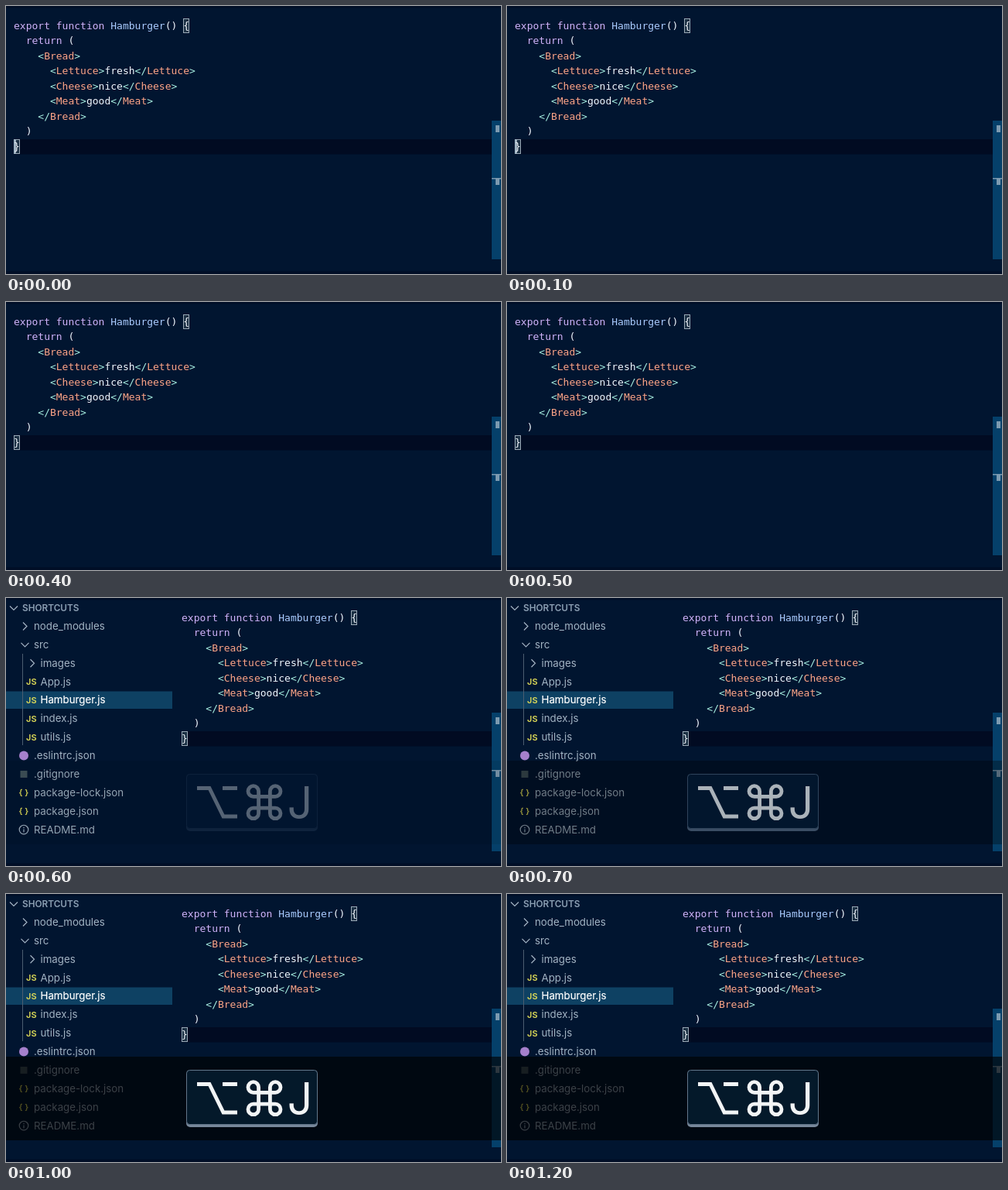
An HTML page that plays this animation: 640 px wide and 346 px high, repeating every 1.3 s.

```html
<!DOCTYPE html>
<html>
<head>
<meta charset="utf-8">
<style>
html, body { margin: 0; width: 100%; height: 100%; overflow: hidden; background: #011530; }
svg { display: block; width: 640px; height: 346px; }
text { white-space: pre; }
#code text { font: 13px "DejaVu Sans Mono", monospace; fill: #f4f8ff; }
#code .word { fill: #d2b4fb; }
#code .func { fill: #acccff; }
#code .mark { fill: #a8efe2; }
#code .tag { fill: #ffa587; }
#side text { font: 13.3px Inter, sans-serif; fill: #a3b3c3; }
#side .head { font-size: 11.8px; font-weight: 600; fill: #8c9fb3; }
#side .open { fill: #fff; stroke: #fff; stroke-width: .2; }
#side .icon { font-size: 11px; font-weight: 600; fill: #dcd957; }
.line { fill: none; stroke: #a3b3c3; stroke-width: 1.2; }
.brace { fill: #1b3044; stroke: #9aa8b5; }
</style>
</head>
<body>
<svg viewBox="0 0 640 346">
  <rect width="640" height="346" fill="#011530"/>
  <path d="M0 0H640V2.5H0ZM0 342.5H640V346H0Z" fill="#010e26"/>
  <g id="code">
    <rect x="10" y="172" width="618" height="19.5" fill="#010b22"/>
    <rect class="brace" x="229.5" y="16.5" width="7" height="18"/>
    <rect class="brace" x="10.5" y="172.5" width="7" height="18"/>
    <rect id="caret" x="10" y="172" width="3" height="19" fill="#9fb2c2"/>
  </g>
  <g id="side">
    <rect y="120.5" width="215" height="22.5" fill="#0e4163"/>
    <path d="M21.5 72V190" stroke="#4b5d70"/>
  </g>
  <rect x="628" y="148" width="12" height="179" fill="#05406a"/>
  <path d="M633 154h5v9h-5ZM628 222h12v1.5h-2v7.5h-5v-7.5h-5Z" fill="#7c9ab0"/>
  <g id="panel">
    <rect y="210" width="640" height="108" fill="#000" opacity=".64"/>
    <rect x="233" y="228" width="170" height="73" rx="5" fill="#77879a"/>
    <rect x="233.5" y="227.5" width="169" height="70" rx="4" fill="#04192a" stroke="#62768a"/>
  </g>
  <g id="keys">
    <g fill="none" stroke="#f2f4f5" stroke-width="4.8">
      <path d="M247 245.5H263L281 282H299M280 245.5H299"/>
      <path id="cmd"/>
    </g>
    <text x="380" y="285" text-anchor="middle" font-family="Inter, sans-serif" font-size="57" fill="#f2f4f5">J</text>
  </g>
</svg>
<script>
const $ = id => document.getElementById(id);
const add = (id, html) => $(id).insertAdjacentHTML("beforeend", html);
const label = (x, y, s, cls = "") => `<text x="${x}" y="${y}" class="${cls}">${s}</text>`;

// Code listing with simple syntax colours
const source = `export function Hamburger() {
  return (
    <Bread>
      <Lettuce>fresh</Lettuce>
      <Cheese>nice</Cheese>
      <Meat>good</Meat>
    </Bread>
  )
}`;
const span = (cls, s) => `<tspan class="${cls}">${s}</tspan>`;
const paint = s => s.replace(/(<\/?)(\w+)(>)|\b(?:export|function|return)\b|Hamburger/g, (all, open, name) =>
  name ? span("mark", open.replace("<", "&lt;")) + span("tag", name) + span("mark", "&gt;")
       : span(all === "Hamburger" ? "func" : "word", all));
source.split("\n").forEach((s, i) => add("code", label(10, 30 + 19.45 * i, paint(s))));

// File tree: icon, label x, name, icon x
const right = (x, y) => `<path class="line" d="M${x} ${y - 5}l5 5l-5 5"/>`;
const down = (x, y) => `<path class="line" d="M${x} ${y - 2.5}l5 5l5 -5"/>`;
const js = (x, y) => label(26, y + 4, "JS", "icon");
const json = (x, y) => label(16.5, y + 3.5, "{ }", "icon");
const dot = (x, y) => `<circle cx="23" cy="${y}" r="6" fill="#a580cc"/>`;
const square = (x, y) => `<rect x="18.5" y="${y - 4.5}" width="9" height="9" fill="#41535b"/>`;
const info = (x, y) => `<circle class="line" cx="23" cy="${y}" r="5.8"/>
  <path class="line" d="M23 ${y - 3.2}v1.5M23 ${y - .6}v4"/>`;
const files = [
  [right, 36, "node_modules", 22], [down, 36, "src", 19.5], [right, 44.5, "images", 31.5],
  [js, 44.5, "App.js"], [js, 44.5, "Hamburger.js"], [js, 44.5, "index.js"], [js, 44.5, "utils.js"],
  [dot, 36, ".eslintrc.json"], [square, 36, ".gitignore"],
  [json, 36, "package-lock.json"], [json, 36, "package.json"], [info, 36, "README.md"]
];
add("side", down(5, 13) + label(21, 17.3, "SHORTCUTS", "head"));
files.forEach(([icon, x, name, iconX], i) => {
  const y = 36.5 + 23.87 * i;
  add("side", icon(iconX, y) + label(x, y + 4.5, name, i === 4 ? "open" : ""));
});

// Command symbol: a square whose sides run into four corner loops
const a = 7.4, r = 6.8, cx = 334, cy = 263.7;
let d = "";
for (const [sx, sy] of [[-1, -1], [1, -1], [1, 1], [-1, 1]]) {
  const x = cx + sx * a, y = cy + sy * a;
  d += `M${x} ${y}v${sy * r}A${r} ${r} 0 1 ${sx * sy > 0 ? 0 : 1} ${x + sx * r} ${y}Z`;
}
d += `M${cx - a} ${cy - a}h${2 * a}v${2 * a}h${-2 * a}Z`;
$("cmd").setAttribute("d", d);

const start = performance.now();
function draw(now) {
  const step = Math.floor(Math.max(0, now - start) % 1300 / 100);
  const open = step >= 6;
  const fade = open ? Math.min(1, (step - 5) * .35) : 0;
  $("code").setAttribute("transform", `translate(${open ? 217 : 0})`);
  $("code").firstElementChild.setAttribute("width", open ? 401 : 618);
  $("caret").setAttribute("opacity", step < 4 ? 1 : 0);
  $("side").setAttribute("visibility", open ? "visible" : "hidden");
  // The panel fades in behind its symbols
  $("panel").setAttribute("opacity", fade * fade);
  $("keys").setAttribute("opacity", fade);
  requestAnimationFrame(draw);
}
draw(start);
</script>
</body>
</html>
```
